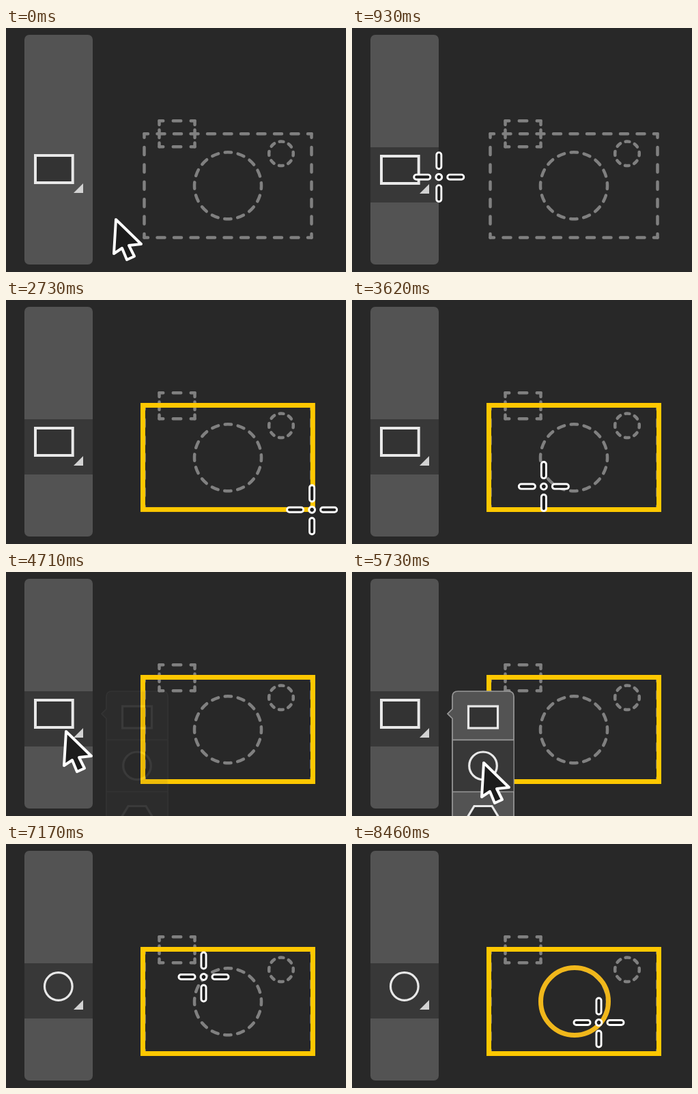
Write an HTML page that moves like this. It is 498 by 358 pixels and loops after 8830 ms.

```html
<!DOCTYPE html>
<html lang="en">
<head>
<meta charset="utf-8">
<title>Drawing with shape tools</title>
<style>
html, body { margin: 0; height: 100%; overflow: hidden; background: #282828; }
svg { display: block; }
.line { fill: none; stroke: #808080; stroke-width: 4.5; stroke-linecap: round; }
.icon { fill: #333; stroke: #e8e8e8; }
.drawn { fill: none; stroke-width: 7; }
.menu { stroke: #999; stroke-width: 1.7; }
</style>
</head>
<body>
<svg width="498" height="358" viewBox="0 0 498 358">
  <rect x="27" y="10" width="100" height="337" rx="7" fill="#535353"/>
  <rect id="active" x="27" y="175" width="100" height="81" fill="#383838"/>
  <g id="tool">
    <rect id="rectTool" class="icon" x="43" y="188" width="54.7" height="40" stroke-width="4"/>
    <circle id="circleTool" class="icon" cx="76.8" cy="209" r="20.3" stroke-width="3.2"/>
    <path d="M113 229v14H99z" fill="#d2d2d2"/>
  </g>
  <g id="sketch" class="line"></g>
  <g id="box"><rect class="drawn" x="3.5" y="3.5" width="249" height="153" stroke="#ffc800"/></g>
  <g id="ring"><circle class="drawn" cx="35" cy="35" r="49.5" stroke="#f0b71b"/></g>
  <g id="menu">
    <path class="menu" fill="#535353" d="M147 365V215l-7-7 7-7V183q0-8 8-8h74q8 0 8 8V365z"/>
    <rect id="hover" x="148" y="247" width="88.5" height="75" fill="#383838"/>
    <path class="menu" d="M147 246.3h90M147 322.5h90"/>
    <rect class="icon" x="170.5" y="197" width="43" height="32" stroke-width="3.2"/>
    <circle class="icon" cx="192" cy="284.3" r="20.3" stroke-width="3.2" style="fill:#383838"/>
    <path class="icon" d="M166 365l13-21.5h26l13 21.5" stroke-width="3.2"/>
  </g>
  <path id="arrow" d="M0 0l-3 50 12-8 7 17 11-5-8-16 18-2z" fill="#1c1c1c" stroke="#fff" stroke-width="4" stroke-linejoin="round"/>
  <g id="cross" stroke-linecap="round">
    <path id="arms" d="M-33 0h17M16 0h17M0-32.5v17M0 15.500v17" stroke="#fff" stroke-width="10"/>
    <path d="M-33 0h17M16 0h17M0-32.5v17M0 15.500v17" stroke="#1c1c1c" stroke-width="4.2"/>
    <circle r="4.400" fill="#1c1c1c" stroke="#fff" stroke-width="3"/>
  </g>
</svg>
<script>
const LOOP = 8830;
const $ = id => document.getElementById(id);
const clamp = v => Math.min(1, Math.max(0, v));
const span = (t, from, to) => clamp((t - from) / (to - from));
const ease = u => u < .5 ? 4 * u ** 3 : 1 - 4 * (1 - u) ** 3;
const show = (id, on) => $(id).style.display = on ? '' : 'none';
const place = (id, x, y, scale = 1) =>
  $(id).setAttribute('transform', `translate(${x} ${y}) scale(${scale})`);

// Dashes repeat a whole number of times and are centred on the path's ends.
function dashed(d, length, count, dash) {
  const path = document.createElementNS('http://www.w3.org/2000/svg', 'path');
  path.setAttribute('d', d);
  path.setAttribute('stroke-dasharray', `${dash} ${length / count - dash}`);
  path.setAttribute('stroke-dashoffset', dash / 2);
  $('sketch').append(path);
}

function dashedRect(x, y, w, h, across, down, dash) {
  for (const top of [y, y + h]) dashed(`M${x} ${top}h${w}`, w, across, dash);
  for (const left of [x, x + w]) dashed(`M${left} ${y}v${h}`, h, down, dash);
}

function dashedCircle(x, y, r, count, dash) {
  const d = `M${x + r} ${y}a${r} ${r} 0 0 1 ${-2 * r} 0a${r} ${r} 0 0 1 ${2 * r} 0`;
  dashed(d, 2 * Math.PI * r, count, dash);
}

dashedRect(202.500, 155.200, 245, 152.300, 10, 6, 11);
dashedRect(224.500, 136.300, 52, 38, 2, 2, 11.5);
dashedCircle(325, 231.300, 49, 16, 9.5);
dashedCircle(403, 184.300, 17.800, 8, 6);

// Pointer moves: start time, end time, x, y
const START = [161, 281];
const MOVES = [
  [0, 738, 92, 252],
  [738, 1180, 198, 152],
  [1180, 2850, 448.500, 308],
  [3050, 4220, 88, 234],
  [4830, 5730, 193, 280],
  [6060, 6090, 192, 278],
  [6360, 7170, 289.500, 195],
  [7440, 8340, 361.500, 267],
  [8340, 8460, 361.500, 262]
];

function pointerAt(t) {
  let [x, y] = START;
  for (const [from, to, toX, toY] of MOVES) {
    const p = ease(span(t, from, to));
    x += (toX - x) * p;
    y += (toY - y) * p;
  }
  return [x, y];
}

function draw(t) {
  const [x, y] = pointerAt(t);
  const crossOn = t >= 6090 || (t > 738 && t < 4500 && x > 127);
  const selected = t >= 600;
  const circlePicked = t >= 5850;

  show('active', selected);
  place('tool', 0, selected ? 0 : -1);
  show('rectTool', !circlePicked);
  show('circleTool', circlePicked);
  $('circleTool').style.fill = '#383838';

  place('box', 197, 151, ease(span(t + 30, 1180, 2850)));
  place('ring', 291, 196, ease(span(t, 7440, 8400)));

  $('menu').style.opacity = span(t, 4680, 5010) * (1 - span(t, 5820, 6060));
  show('hover', x > 147 && y > 247);

  show('arrow', !crossOn);
  show('cross', crossOn);
  place(crossOn ? 'cross' : 'arrow', x, y);
}

function tick() {
  draw(performance.now() % LOOP);
  requestAnimationFrame(tick);
}
tick();
</script>
</body>
</html>
```
